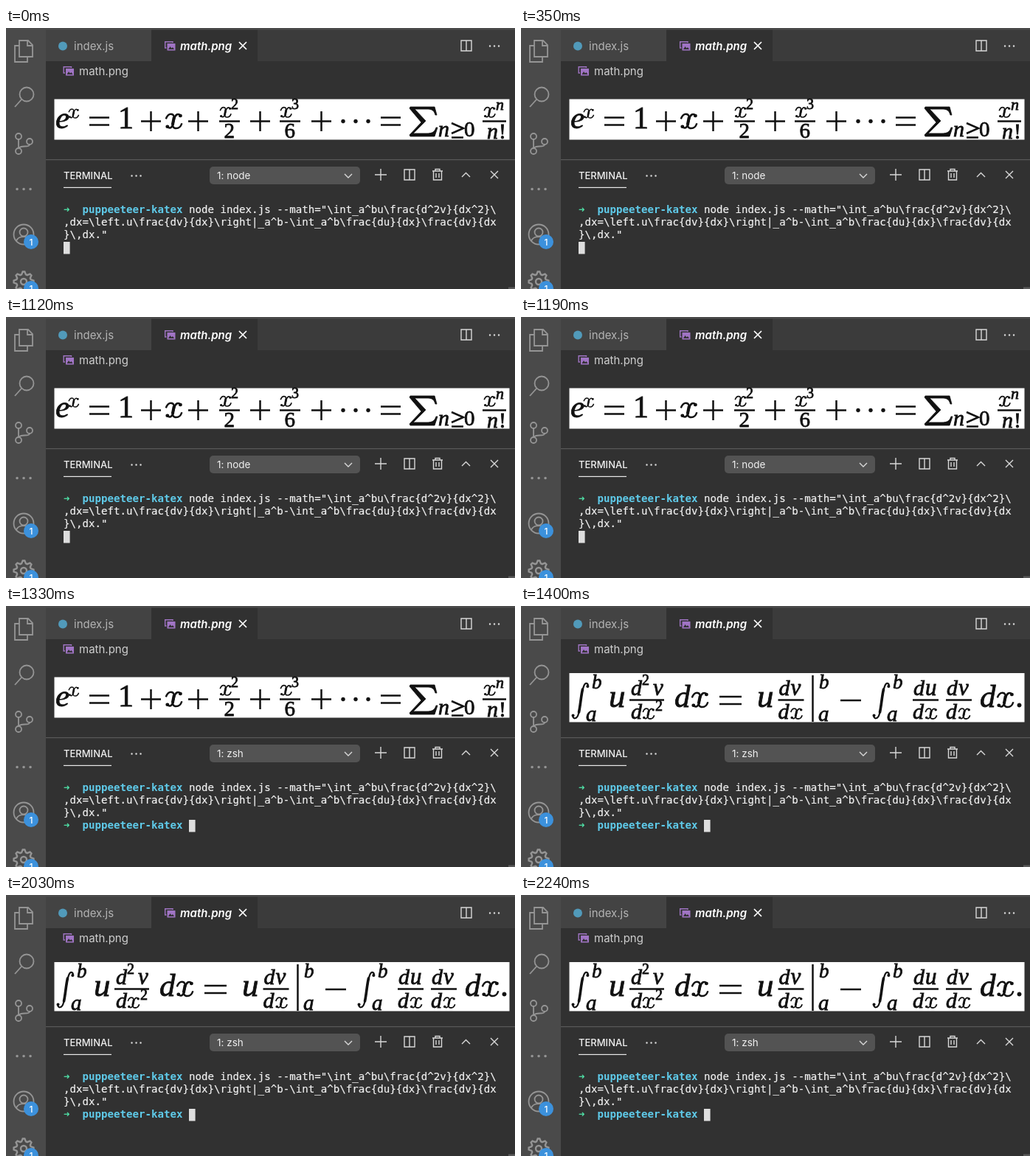
Write an HTML page that moves like this. It is 690 by 354 pixels and loops after 2310 ms.

```html
<!DOCTYPE html>
<html lang="en">
<head>
<meta charset="utf-8">
<title>Formula rendering in an editor</title>
<style>
html, body { margin: 0; width: 100%; height: 100%; overflow: hidden; background: #313131; }
svg { display: block; width: 690px; height: 354px; }
text { white-space: pre; }
.ui { font-family: Inter, sans-serif; font-size: 15px; fill: #b4b4b4; }
.small { font-size: 13px; fill: #f0f0f0; }
.term { font-family: "DejaVu Sans Mono", monospace; font-size: 14.13px; fill: #f0f0f0; }
.term text { stroke: #f0f0f0; stroke-width: .2; }
.term .arrow { fill: #4fe0a6; stroke: none; font-weight: bold; }
.term .dir { fill: #5fcbea; stroke: none; font-weight: bold; }
.line { fill: none; stroke: #d8d8d8; stroke-width: 1.4; }
.side { fill: none; stroke: #959595; stroke-width: 1.8; }
.math { font-family: "Liberation Serif", serif; fill: #111; stroke: #111; stroke-width: .8; }
.math .it { font-style: italic; }
.math .rule { fill: none; stroke-width: 2.5; }
</style>
</head>
<body>
<svg viewBox="0 0 690 354">
  <defs>
    <g id="varx" stroke="#111" fill="none" stroke-width=".055">
      <path d="M.04-.28C.08-.4 .14-.43 .19-.43C.28-.43 .3-.35 .27-.22C.22-.05 .26 0 .35 0C.42 0 .49-.05 .52-.15"/>
      <path d="M.09-.05C.14 .02 .22 0 .25-.13L.3-.31C.33-.42 .42-.46 .48-.38"/>
      <path stroke-width=".09" d="M.285-.33L.24-.1"/>
      <path stroke-width=".1" stroke-linecap="round" d="M.08-.05h.01M.47-.38h.01"/>
    </g>
    <g id="integral" fill="none" stroke="#111" stroke-linecap="round">
      <path stroke-width="2.2" d="M70 148C70 154 76 154 78 146C81 135 81 119 85 109C87 103 91 104 91 109"/>
      <path stroke-width="3.6" d="M78.5 144C80.5 135 81.5 121 83.5 113"/>
      <path stroke-width="4" d="M70.5 148.5h.1M90.3 109h.1"/>
    </g>
    <g id="picture">
      <path fill="none" stroke="#a074c4" stroke-width="1.4" d="M2.5 9H.7V.7H11V2"/>
      <rect x="3.5" y="3" width="11" height="9.5" fill="#a074c4"/>
      <path fill="#313131" d="M5 11L7.5 7L9.5 9.5L11 8L13 11Z"/>
    </g>
    <g id="badge">
      <circle r="10" fill="#3c91dc"/>
      <text class="ui" y="4.5" text-anchor="middle" style="font-size:12px;font-weight:500;fill:#fff">1</text>
    </g>
    <path id="split" class="line" d="M0 0H14V14H0ZM7 0V14"/>
  </defs>

  <rect width="690" height="354" fill="#313131"/>
  <rect x="54" width="636" height="45" fill="#3b3b3b"/>
  <rect x="54" width="143" height="45" fill="#434343"/>
  <rect x="197" width="144" height="45" fill="#313131"/>
  <rect width="54" height="354" fill="#4a4a4a"/>
  <rect width="690" height="2.5" fill="#4c4c4c"/>
  <rect x="54" y="178" width="636" height="1.2" fill="#595959"/>
  <rect x="681" y="351.5" width="9" height="2.5" fill="#5a5a5a"/>

  <g class="side">
    <path d="M18 17H30L36 23V39H18ZM29 17V24H36M18 24H12V46H29V39"/>
    <circle cx="28" cy="90" r="9.5"/>
    <path d="M21 97L12 107"/>
    <circle cx="17" cy="147" r="4"/>
    <circle cx="17" cy="167" r="4"/>
    <circle cx="32" cy="154" r="4"/>
    <path d="M17 151V163M32 158C32 163 20 158 17.5 163"/>
    <path stroke-width="3.5" stroke-linecap="round" d="M15 218.5h.1M24 218.5h.1M33 218.5h.1"/>
    <circle cx="24" cy="280" r="13.5"/>
    <circle cx="24" cy="277" r="5.5"/>
    <path d="M14 289C16 281 32 281 34 289"/>
    <path id="gear" stroke-width="2.4"/>
    <circle cx="24" cy="344" r="4" stroke-width="2.4"/>
  </g>
  <use href="#badge" x="34" y="290"/>
  <use href="#badge" x="34" y="353"/>

  <circle cx="77" cy="24.5" r="6" fill="#519aba"/>
  <text class="ui" x="92" y="30">index.js</text>
  <use href="#picture" x="215" y="18"/>
  <text class="ui" x="236" y="30" style="font-style:italic;font-weight:600;fill:#fff">math.png</text>
  <path class="line" style="stroke:#fff;stroke-width:1.7" d="M316 19L326 29M326 19L316 29"/>
  <use href="#split" x="617" y="17"/>
  <path class="line" style="stroke-width:2.4;stroke-linecap:round" d="M656 24.5h.1M662 24.5h.1M668 24.5h.1"/>
  <use href="#picture" x="77.5" y="52"/>
  <text class="ui" x="99" y="64" style="fill:#cfcfcf">math.png</text>

  <g class="math" id="series"></g>
  <g class="math" id="parts"></g>

  <text class="ui small" x="78" y="205" style="font-weight:500">TERMINAL</text>
  <rect x="78" y="215.8" width="65" height="1.2" fill="#e8e8e8"/>
  <path class="line" style="stroke-width:2.4;stroke-linecap:round" d="M170.5 200.5h.1M176.5 200.5h.1M182.5 200.5h.1"/>
  <rect x="276" y="188" width="204" height="24" rx="5" fill="#535353"/>
  <text class="ui small" x="286" y="205" style="font-size:13.5px" id="shell"></text>
  <g class="line">
    <path d="M459 198L464 203L469 198M500 199H516M508 191V207"/>
    <use href="#split" x="540" y="192"/>
    <path d="M578 194H592M582 194V191.5H588V194M579.5 194V206H590.5V194M583 197V203M587 197V203"/>
    <path d="M618 202L623.5 196.5L629 202M657 194L667 204M667 194L657 204"/>
  </g>

  <g class="term">
    <text x="78" y="250.5" class="arrow">➜</text>
    <text x="103.5" y="250.5"><tspan class="dir">puppeeteer-katex</tspan> node index.js --math="\int_a^bu\frac{d^2v}{dx^2}\</text>
    <text x="78" y="267.5">,dx=\left.u\frac{dv}{dx}\right|_a^b-\int_a^b\frac{du}{dx}\frac{dv}{dx</text>
    <text x="78" y="284.5">}\,dx."</text>
    <g id="prompt">
      <text x="78" y="301.5" class="arrow">➜</text>
      <text x="103.5" y="301.5" class="dir">puppeeteer-katex</text>
    </g>
    <rect id="cursor" y="290" width="8.6" height="16.5" fill="#dedede"/>
  </g>
</svg>

<script>
const LOOP = 2310, COMMAND_DONE = 1260, IMAGE_READY = 1400;
const $ = id => document.getElementById(id);

// Formula pieces; every y is a baseline, except for rules.
const glyph = (s, x, y, size, cls = "it") =>
  `<text class="${cls}" x="${x}" y="${y}" font-size="${size}">${s}</text>`;
const digit = (s, x, y, size) => glyph(s, x, y, size, "");
const varX = (x, y, size) => `<use href="#varx" transform="translate(${x} ${y}) scale(${size})"/>`;
const rule = d => `<path class="rule" d="${d}"/>`;
const plus = x => rule(`M${x} 126.5h27m-13.5-13.5v27`);
const equals = (x, y, w = 27) => rule(`M${x} ${y - 5}h${w}m0 10h${-w}`);
const bar = (x, y, w) => rule(`M${x} ${y}h${w}`);
const paper = (y, h) => `<rect x="65.5" y="${y}" width="617" height="${h}" fill="#fff" stroke="none"/>`;

const power = (x, exponent, divisor) =>
  varX(x, 121, 31) + digit(exponent, x + 16, 110, 20) +
  bar(x, 126.5, 28) + digit(divisor, x + 6.5, 149, 29);

$("series").innerHTML = paper(96.5, 55) +
  glyph("e", 67, 136, 43) + varX(84, 122, 28) + equals(113, 126.5) +
  digit("1", 152, 136, 42) + plus(183) + varX(215, 136, 45) + plus(247) +
  power(289, 2, 2) + plus(331) + power(371, 3, 6) + plus(414) +
  [457, 474, 491].map(x => `<circle cx="${x}" cy="126.5" r="2.4"/>`).join("") +
  equals(508, 126.5) +
  `<path d="M548 107H581L584 118H582C580 111 577 110 570 110H554L569 126L552 143H570C578 143 581 141 583 135H585L581 147H548L547 145L563 128L547 109Z"/>` +
  glyph("n", 586, 147, 30) + rule("M604 129L620 136L604 143M604 148.5H620") + digit("0", 621, 147, 29) +
  varX(647, 121, 31) + glyph("n", 664, 111, 22) + bar(646, 126.5, 32) +
  glyph("n", 652, 150, 30) + digit("!", 668, 150, 30);

const limits = (bx, ax) => glyph("b", bx, 112, 27) + glyph("a", ax, 156, 29);
const integral = x => `<use href="#integral" x="${x - 69}"/>` + limits(x + 27, x + 19);
const differential = x => glyph("d", x, 137, 43) + varX(x + 22, 137, 45);
const derivative = (x, name) =>
  glyph("d", x + 1, 121, 30) + glyph(name, x + 17, 121, 31) + bar(x, 127.5, 35) +
  glyph("d", x, 153, 30) + varX(x + 16, 153, 32);

$("parts").innerHTML = paper(91, 66.5) +
  integral(69) + glyph("u", 119, 137, 45) +
  glyph("d", 149, 121, 30) + digit(2, 164, 107, 20) + glyph("v", 179, 121, 31) +
  bar(147, 127.5, 47) + glyph("d", 149, 153, 30) + varX(164, 153, 32) + digit(2, 182, 142, 20) +
  differential(208) + equals(269, 128, 30) + glyph("u", 320, 137, 45) + derivative(348.5, "v") +
  rule("M395.5 94V157") + limits(404, 403) + bar(433, 128, 28) +
  integral(477) + derivative(531, "u") + derivative(576, "v") +
  differential(622) + `<circle cx="675.5" cy="134.5" r="2.6"/>`;

const teeth = 8, step = Math.PI / teeth / 2;
$("gear").setAttribute("d", "M" + Array.from({ length: teeth * 4 }, (_, i) => {
  const radius = i % 4 < 2 ? 13.5 : 10, angle = (i - .5) * step;
  return `${24 + radius * Math.cos(angle)} ${344 + radius * Math.sin(angle)}`;
}).join("L") + "Z");

const show = (id, on) => $(id).setAttribute("visibility", on ? "visible" : "hidden");

function draw() {
  const time = performance.now() % LOOP;
  const done = time >= COMMAND_DONE, ready = time >= IMAGE_READY;
  show("series", !ready);
  show("parts", ready);
  show("prompt", done);
  $("shell").textContent = done ? "1: zsh" : "1: node";
  $("cursor").setAttribute("x", done ? 248 : 78);
  requestAnimationFrame(draw);
}
draw();
</script>
</body>
</html>
```
